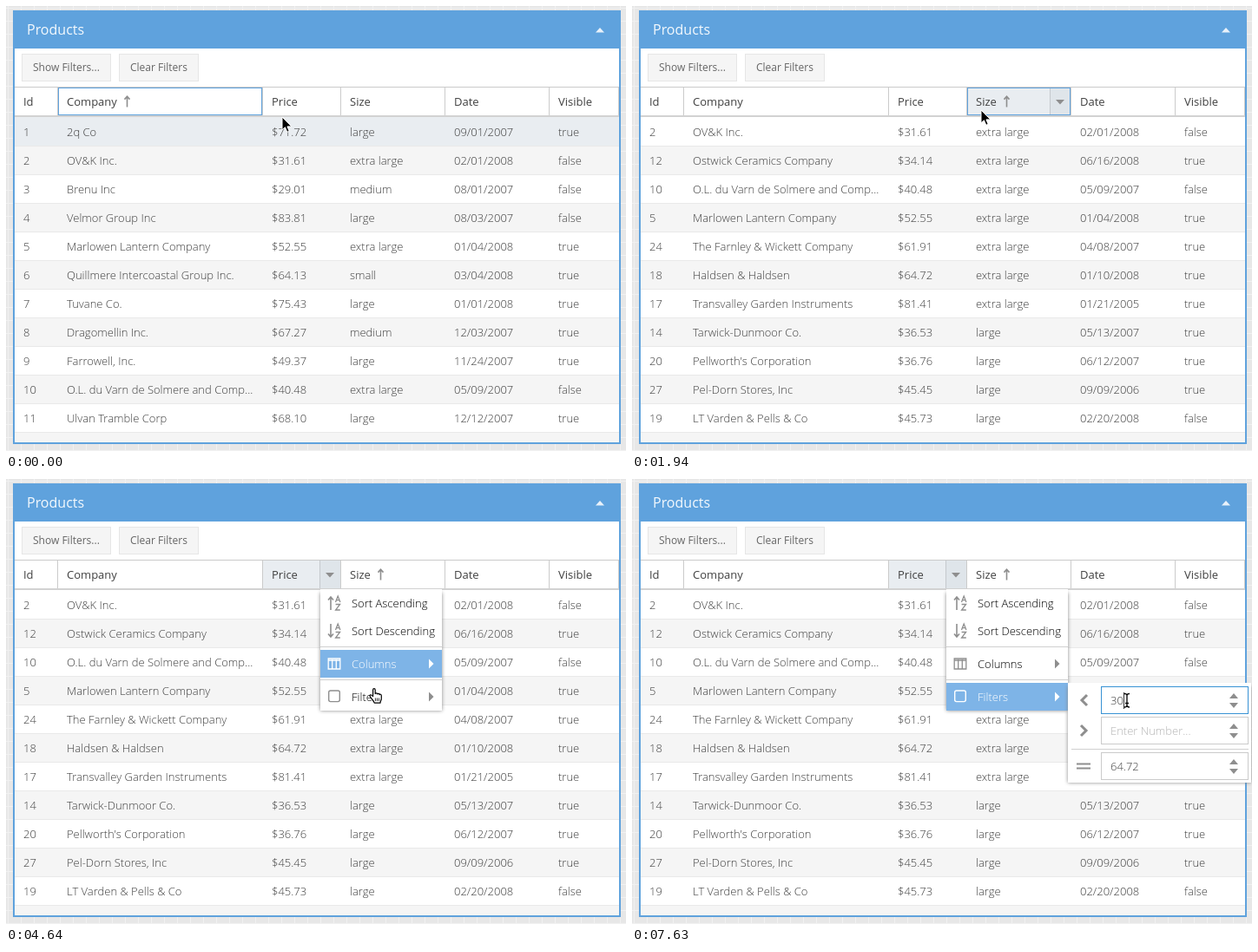
Recreate the animation shown at these times as an HTML page. Size 714x513 px, loop 8 s.

```html
<!DOCTYPE html>
<html lang="en">
<head>
<meta charset="utf-8">
<title>Products grid</title>
<style>
  html, body { margin: 0; width: 100%; height: 100%; overflow: hidden; background: #e7e7e7; }
  svg { display: block; width: 714px; height: 513px; }
  text { font: 400 13px "Open Sans", "Noto Sans", sans-serif; fill: #404040; }
  .light { font-weight: 300; }
  .title { font-size: 16px; fill: #f4f9fd; }
  .btn { font-size: 12px; fill: #666; }
  .item { font-weight: 300; fill: #000; }
  .hint { fill: #b4b4b4; }
  .on text { fill: #fff; }
  .shadow { filter: drop-shadow(0 0 2px #888); }
  .focus { fill: none; stroke: #5fa2dd; }
  .icon { fill: none; stroke: #8e8e8e; stroke-width: 1.6; }
  .on .icon { stroke: #fff; }
  .solid { fill: #8e8e8e; }
  .on .solid { fill: #fff; }
</style>
</head>
<body>
<svg id="stage" viewBox="0 0 714 513"></svg>
<script>
const LOOP = 8000;
const BLUE = '#5fa2dd', HOVER = '#e9edf1', LINE = '#cbcbcb';

const products = `
1|2q Co|71.72|large|09/01/2007|true
2|OV&K Inc.|31.61|extra large|02/01/2008|false
3|Brenu Inc|29.01|medium|08/01/2007|false
4|Velmor Group Inc|83.81|large|08/03/2007|false
5|Marlowen Lantern Company|52.55|extra large|01/04/2008|true
6|Quillmere Intercoastal Group Inc.|64.13|small|03/04/2008|true
7|Tuvane Co.|75.43|large|01/01/2008|true
8|Dragomellin Inc.|67.27|medium|12/03/2007|true
9|Farrowell, Inc.|49.37|large|11/24/2007|true
10|O.L. du Varn de Solmere and Comp...|40.48|extra large|05/09/2007|false
11|Ulvan Tramble Corp|68.10|large|12/12/2007|true
12|Ostwick Ceramics Company|34.14|extra large|06/16/2008|true
13|Hadwyn Looms Corporation|30.27|medium|12/07/2006|true
14|Tarwick-Dunmoor Co.|36.53|large|05/13/2007|true
15|Brackenfold Intl Inc|38.77|medium|11/07/2006|false
16|Ovrel Corporation|19.88|small|01/09/2007|true
17|Transvalley Garden Instruments|81.41|extra large|01/21/2005|true
18|Haldsen & Haldsen|64.72|extra large|01/10/2008|true
19|LT Varden & Pells & Co|45.73|large|02/20/2008|false
20|Pellworth's Corporation|36.76|large|06/12/2007|true
21|Quovan Inc|27.96|small|12/30/2007|false
23|The Barn Ladder, Inc|34.64|small|12/31/2006|true
24|The Farnley & Wickett Company|61.91|extra large|04/08/2007|true
26|Tolvane Communications|35.57|small|07/09/2005|false
27|Pel-Dorn Stores, Inc|45.45|large|09/09/2006|true`.trim().split('\n').map(line => {
  const [id, name, price, size, date, visible] = line.split('|');
  return { id, name, price, size, date, visible };
});

// Column left edges; the last entry closes the grid.
const edges = [10, 60, 296, 386, 506, 626, 706];
const titles = ['Id', 'Company', 'Price', 'Size', 'Date', 'Visible'];

// Markup helpers
const esc = s => s.replace(/&/g, '&amp;');
const rect = (x, y, w, h, fill, more = '') =>
  `<rect x="${x}" y="${y}" width="${w}" height="${h}" fill="${fill}" ${more}/>`;
const box = (x, y, w, h, more = '') =>
  `<rect x="${x + .5}" y="${y + .5}" width="${w - 1}" height="${h - 1}" ${more}/>`;
const text = (x, y, s, cls = '', more = '') =>
  `<text x="${x}" y="${y}" class="${cls}" ${more}>${esc(s)}</text>`;
const path = (d, cls, more = '') => `<path d="${d}" class="${cls}" ${more}/>`;
const group = (id, body, cls = '') => `<g id="${id}" class="${cls}">${body}</g>`;

function rows(id, compare) {
  const list = [...products].sort(compare).slice(0, 11);
  return group(id, list.map((p, i) => {
    const cells = [p.id, p.name, '$' + p.price, p.size, p.date, p.visible];
    return cells.map((c, k) => text(edges[k] + 10, 150 + 33 * i, c, 'light')).join('');
  }).join(''));
}

function stripes() {
  let out = '';
  for (let i = 0; i < 12; i++) {
    const y = 129 + 33 * i, h = Math.min(33, 503 - y);
    out += rect(10, y, 696, h, i % 2 ? '#f5f5f5' : '#fff');
    if (h === 33) out += rect(10, y + 32, 696, 1, '#e9e9e9');
  }
  return out;
}

function headerHover(id, col) {
  const x = edges[col], r = edges[col + 1] - 1;
  return group(id, rect(x, 94, r - x, 32, HOVER) + rect(r - 24, 94, 24, 32, '#dfe5ea') +
    rect(r - 24, 94, 1, 32, '#c4c9cd') + path(`M${r - 17} 108h10l-5 5.5z`, 'solid'));
}
const headerFocus = (id, col) =>
  group(id, box(edges[col], 94, edges[col + 1] - 1 - edges[col], 32, 'class="focus"'));
const sortMark = (id, x) =>
  group(id, path(`M${x} 116.5V104.5M${x - 3} 107.6L${x} 104.3L${x + 3} 107.6`, 'icon'));

// Menu icons, drawn around (0, 0)
const letters = '<g class="icon" style="stroke-width:1.3">' +
  '<path d="M1.5 -1L4.2 -8L6.9 -1M2.5 -3.3H5.9M1.6 1.5H6.6L1.6 8H6.8"/></g>';
const icons = {
  asc: path('M-4 8V-7M-7 -3.5L-4 -7L-1 -3.5', 'icon') + letters,
  desc: path('M-4 -8V7M-7 3.5L-4 7L-1 3.5', 'icon') + letters,
  cols: path('M-6.8 -6H6.8V6H-6.8ZM-6.8 -4H6.8M-2.3 -5V6M2.3 -5V6', 'icon', 'style="stroke-width:1.3"'),
  check: '<rect x="-6.3" y="-7" width="12.6" height="12.6" rx="2" class="icon" style="stroke-width:1.4"/>'
};

function item(top, label, icon, arrow, id) {
  const mid = top + 16;
  const body = (id ? rect(362, top, 140, 32, '#7eb4e7') : '') +
    `<g transform="translate(378 ${mid})">${icons[icon]}</g>` + text(398, mid + 5, label, 'item') +
    (arrow ? path(`M487 ${mid - 5.5}v11l5.5 -5.5z`, 'solid') : '');
  return id ? group(id, body, 'on') : body;
}

// Floating panel: the shadow falls on the sides and the bottom only.
const panel = (x, y, w, h) =>
  rect(x, y + 4, w, h - 4, '#fff', 'class="shadow"') + rect(x, y, w, h, '#fff');

const field = top => box(540, top, 170, 32, `fill="#fff" stroke="${LINE}"`) +
  path(`M688 ${top + 14}h10l-5 -6zM688 ${top + 19}h10l-5 6z`, 'solid');

// Pointers, hot spot or corner at (0, 0)
const ink = 'fill="#000" stroke="#fff" stroke-width="1" stroke-linejoin="round"';
const pointers = {
  arrow: path('M0 0V14.8L3.4 11.7L5.8 17.3L8.2 16.3L5.9 10.9H10.8Z', '', ink),
  hand: path('M4.6 9.6V2.2C4.6 .2 7.2 .2 7.2 2.2V6.6C7.7 5.4 9.6 5.6 9.7 7C10.2 6 12 6.2 12.1 7.6' +
    'C12.7 6.8 14.3 7.2 14.3 8.8V11.6C14.3 13.9 13 15 13 17.2H6.2C5.8 15.2 4 13.8 2.8 11.9' +
    'C2 10.6 .5 9.3 1 8.4C1.7 7.3 3.5 8.2 4.6 9.6Z', '',
    'fill="#fff" stroke="#000" stroke-width="1.2" stroke-linejoin="round"') +
    path('M7.4 11.5V15M9.4 11.5V15M11.4 11.5V15', '', 'stroke="#000" stroke-width=".8"'),
  beam: ['#fff', '#000'].map((c, i) =>
    path('M-3 -7.5Q0 -7.5 0 -5.5Q0 -7.5 3 -7.5M0 -5.5V6M-3 8Q0 8 0 6Q0 8 3 8M-2 3.5H2', '',
      `fill="none" stroke="${c}" stroke-width="${i ? 1.3 : 2.2}"`)).join('')
};

document.getElementById('stage').innerHTML = `
  <defs><pattern id="weave" width="15" height="15" patternUnits="userSpaceOnUse">
    ${rect(0, 0, 15, 15, '#e7e7e7') + rect(0, 2, 15, 1, '#f1f1f1') + rect(2, 0, 1, 15, '#f1f1f1')}
  </pattern></defs>` +
  rect(0, 0, 714, 513, 'url(#weave)') +
  rect(8, 5, 700, 500, BLUE) + rect(10, 49, 696, 454, '#fff') +
  text(24, 33, 'Products', 'title') +
  path('M679 30.5h10l-5 -5.5z', '', 'fill="#e8f1fa"') +
  box(18, 55, 103, 32, 'fill="#f5f5f5" stroke="#e6e6e6"') + text(31, 75, 'Show Filters...', 'btn') +
  box(130, 55, 92, 32, 'fill="#f5f5f5" stroke="#e6e6e6"') + text(143, 75, 'Clear Filters', 'btn') +
  stripes() + group('rowHover', rect(10, 128, 696, 33, HOVER)) +
  rect(10, 93, 696, 1, LINE) + rect(10, 126, 696, 2, '#d2d2d2') +
  edges.slice(1).map(x => rect(x - 1, 94, 1, 32, LINE)).join('') +
  headerHover('priceHover', 2) + headerHover('sizeHover', 3) +
  titles.map((s, i) => text(edges[i] + 10, 115, s)).join('') +
  sortMark('nameSort', 139.5) + sortMark('priceSort', 347.5) + sortMark('sizeSort', 431.5) +
  headerFocus('nameFocus', 1) + headerFocus('priceFocus', 2) + headerFocus('sizeFocus', 3) +
  rows('byName', (a, b) => a.id - b.id) +
  rows('byPrice', (a, b) => a.price - b.price) +
  rows('bySize', (a, b) => a.size.localeCompare(b.size) || a.price - b.price) +
  group('menu',
    panel(362, 127, 140, 140) +
    item(127, 'Sort Ascending', 'asc') + item(159, 'Sort Descending', 'desc') +
    item(197, 'Columns', 'cols', true) + item(235, 'Filters', 'check', true) +
    rect(362, 193, 140, 1, '#d0d0d0') + rect(362, 231, 140, 1, '#d0d0d0') +
    item(197, 'Columns', 'cols', true, 'colsOn') + item(235, 'Filters', 'check', true, 'filtersOn')) +
  group('submenu',
    panel(502, 235, 211, 115) +
    rect(506, 311, 204, 1, '#d0d0d0') +
    path('M524 249L518 255L524 261M517 284L523 290L517 296', 'icon', 'style="stroke-width:3"') +
    path('M512 328.5h16M512 333.5h16', 'icon', 'style="stroke-width:2"') +
    field(239) + field(274) + field(315) +
    group('fieldFocus', box(540, 239, 170, 32, 'class="focus" style="stroke:#3892d4"')) +
    text(551, 260, 'Enter Number...', 'light hint', 'id="hint"') +
    text(551, 260, '30', 'light', 'id="typed"') +
    text(551, 295, 'Enter Number...', 'light hint') + text(551, 336, '64.72', 'light') +
    rect(551, 246, 1, 19, '#333', 'id="caret"') + rect(566, 246, 1, 19, '#333', 'id="caretEnd"')) +
  Object.keys(pointers).map(k => group(k, pointers[k])).join('');

// Hold each value until the next step: [[ms, value], ...]
function track(id, prop, steps) {
  const frames = steps.map(([t, v]) => ({ offset: t / LOOP, [prop]: v, easing: 'step-end' }));
  frames.push({ offset: 1, [prop]: steps[steps.length - 1][1] });
  document.getElementById(id).animate(frames, { duration: LOOP, iterations: Infinity });
}

// Alternating on and off times; the part is hidden before the first.
function show(id, ...times) {
  const steps = times.map((t, i) => [t, i % 2 ? 0 : 1]);
  if (times[0] > 0) steps.unshift([0, 0]);
  track(id, 'opacity', steps);
}

const shown = {
  rowHover: [0, 150],
  priceHover: [150, 1340, 3290], sizeHover: [1340, 3290],
  nameFocus: [0, 600], priceFocus: [600, 1790, 3890, 4640], sizeFocus: [1790, 3890],
  nameSort: [0, 740], priceSort: [740, 1940], sizeSort: [1940],
  byName: [0, 740], byPrice: [740, 1940], bySize: [1940],
  menu: [3890], colsOn: [4640, 4790], filtersOn: [4790], submenu: [4940],
  fieldFocus: [5840], hint: [0, 7630], typed: [7630],
  caret: [5840, 6280, 6730, 7330], caretEnd: [7630]
};
for (const id in shown) show(id, ...shown[id]);

const pointerPath = [
  [0, 'arrow', 318, 128], [150, 'arrow', 314, 112], [300, 'arrow', 314, 106],
  [1190, 'arrow', 408, 118], [1340, 'arrow', 419, 122], [1490, 'arrow', 402, 120],
  [3140, 'arrow', 369, 105], [3290, 'hand', 368, 110], [4490, 'hand', 387, 153],
  [4640, 'hand', 418, 241], [4790, 'hand', 428, 243], [5690, 'arrow', 519, 245],
  [5840, 'beam', 569, 255], [5980, 'beam', 570, 255]
];
for (const kind in pointers) {
  track(kind, 'transform', pointerPath.map(([t, k, x, y]) =>
    [t, k === kind ? `translate(${x}px, ${y}px)` : 'translate(-60px, -60px)']));
}
</script>
</body>
</html>
```
